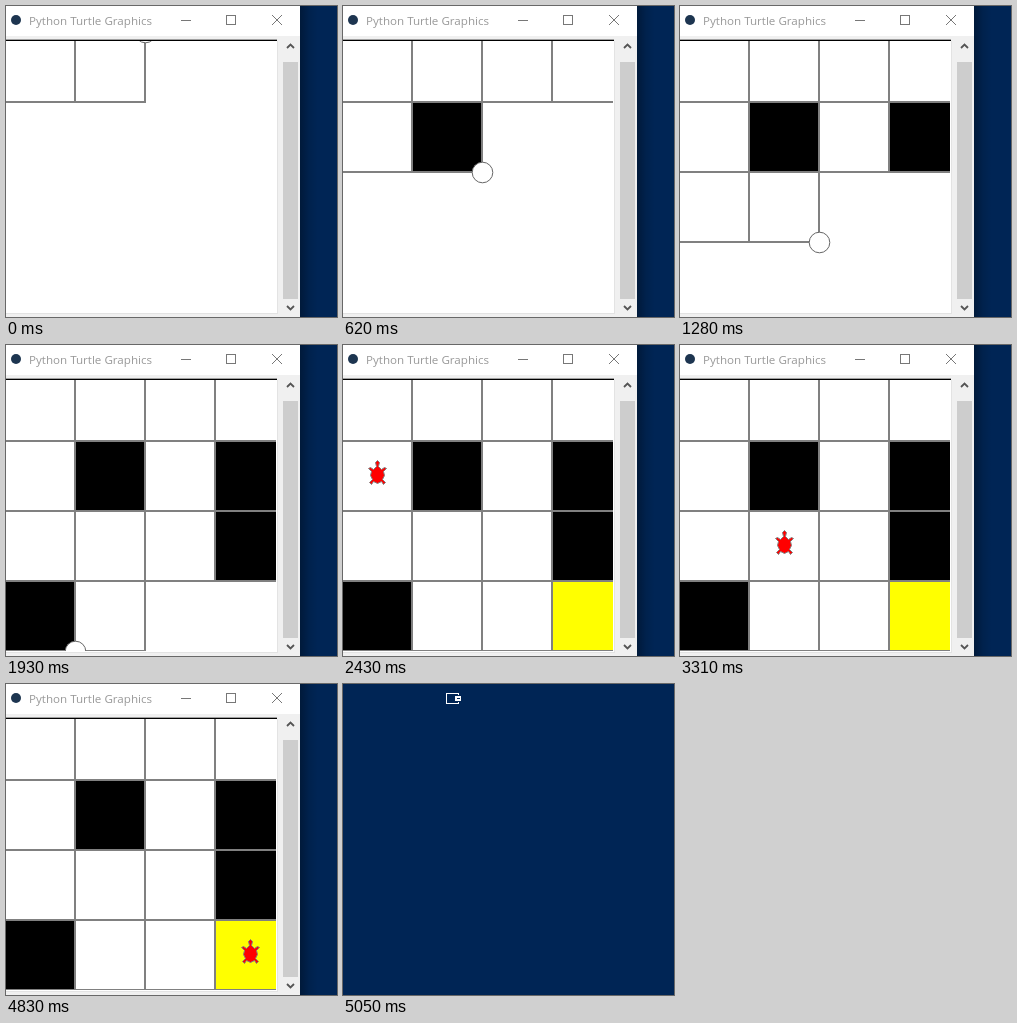
Animation, 331 px wide and 311 px high, one loop 5190 ms. Source, as an HTML page:

```html
<!DOCTYPE html>
<html lang="en">
<head>
<meta charset="utf-8">
<title>Grid world</title>
<style>
  html, body { margin: 0; width: 100%; height: 100%; overflow: hidden; background: #002555; }
  svg { display: block; width: 331px; height: 311px; }
  #win { transform-origin: 80px 165px; }
  text { font: 11.6px "Open Sans", "Noto Sans", sans-serif; fill: #999; }
</style>
</head>
<body>
<svg viewBox="0 0 331 311">
  <defs>
    <linearGradient id="shade">
      <stop offset="0" stop-color="#000" stop-opacity=".32"/>
      <stop offset=".5" stop-color="#000" stop-opacity=".1"/>
      <stop offset="1" stop-color="#000" stop-opacity="0"/>
    </linearGradient>
    <clipPath id="view"><rect y="35" width="270" height="271"/></clipPath>
  </defs>

  <rect width="331" height="311" fill="#002555"/>
  <g shape-rendering="crispEdges">
    <rect x="103.5" y="9.5" width="12" height="10" fill="none" stroke="#fff"/>
    <rect x="110" y="11" width="8" height="7" fill="#002555"/>
    <rect x="112" y="12" width="6" height="5" fill="#fff"/>
    <rect x="114" y="14" width="3" height="1" fill="#002555"/>
  </g>

  <g id="win">
    <rect x="294" width="18" height="311" fill="url(#shade)"/>
    <rect x="-150" width="444" height="330" fill="#f0f0f0"/>
    <rect x="-150" width="444" height="30" fill="#fff"/>
    <circle cx="10" cy="14" r="5" fill="#1d3550"/>
    <text x="23" y="19">Python Turtle Graphics</text>
    <g fill="none" stroke="#777">
      <path d="M175 14.5h10M220.5 9.5h9v9h-9z" shape-rendering="crispEdges"/>
      <path d="M266 9l10 10M276 9l-10 10"/>
    </g>

    <rect x="-150" y="33" width="421" height="1" fill="#a0a0a0"/>
    <rect x="-150" y="34" width="421" height="1" fill="#000"/>
    <rect x="-150" y="35" width="422" height="273" fill="#e3e3e3"/>
    <rect x="-150" y="35" width="421" height="272" fill="#fff"/>
    <rect x="277" y="56" width="15" height="237" fill="#cdcdcd"/>
    <path d="M281 42l3.5-3.5 3.5 3.5M281 300l3.5 3.5 3.5-3.5" fill="none" stroke="#555" stroke-width="1.8"/>

    <g clip-path="url(#view)">
      <g id="fills" shape-rendering="crispEdges"></g>
      <path id="lines" fill="none" stroke="#808080" stroke-width="2" shape-rendering="crispEdges"/>
      <circle id="pen" r="10.3" stroke="#666"/>
      <path id="turtle" fill="#f00" stroke="#808080"/>
    </g>
  </g>
</svg>
<script>
const LOOP = 5190, UNIT = 70, LEFT = -1, TOP = 26;
const CELL_MS = 166, FIRST = 2.31;           // drawing pace, progress at time 0
const MAP = "SFFF" + "FHFH" + "FFFH" + "HFFG";
const COLORS = { H: "#000", G: "#ff0" };
const SIDES = ["v-70", "h70", "v70", "h-70"];
const CORNERS = [[0, 1], [0, 0], [1, 0], [1, 1], [0, 1]];
const ROUTE = [[0, 1], [0, 2], [1, 2], [2, 2], [2, 3], [3, 3]];
const ROUTE_START = 2290, ROUTE_STEP = 500;
const CLOSE_START = 4870, CLOSE_MS = 170;

const $ = id => document.getElementById(id);
const [win, fills, lines, pen, turtle] = ["win", "fills", "lines", "pen", "turtle"].map($);
const set = (el, attrs) => { for (const k in attrs) el.setAttribute(k, attrs[k]); };
const color = i => COLORS[MAP[i]] || "#fff";
const px = col => LEFT + col * UNIT;
const py = row => TOP + row * UNIT;

const squares = [...MAP].map((_, i) => {
  const r = document.createElementNS("http://www.w3.org/2000/svg", "rect");
  set(r, { x: px(i % 4), y: py(i >> 2), width: UNIT, height: UNIT, fill: color(i) });
  return fills.appendChild(r);
});

// right half of the turtle, mirrored for the left
const half = [[0, -16], [2, -14], [1, -10], [4, -7], [7, -9], [9, -8], [6, -5],
  [7, -1], [5, 3], [8, 6], [6, 8], [4, 5], [0, 7]];
const mirror = half.slice(1, -1).reverse().map(([x, y]) => [-x, y]);
turtle.setAttribute("d", "M" + half.concat(mirror).join("L") + "z");

function snap(t) {
  if (t < 60) return 0;
  if (t < 620) return t - (t - 60) % 70;
  const u = (t - 620) % 290;
  return t - (u < 80 ? u : (u - 80) % 70);
}

function drawGrid(t) {
  const p = Math.min(FIRST + t / CELL_MS, 16);
  const now = Math.floor(p), side = Math.floor((p - now) * 5);
  let d = "";
  squares.forEach((sq, i) => {
    const n = i < now ? 4 : i === now ? side : 0;
    sq.style.display = n === 4 ? "" : "none";
    if (n) d += `M${px(i % 4)} ${py((i >> 2) + 1)}` + SIDES.slice(0, n).join("");
  });
  lines.setAttribute("d", d);

  const drawing = now < 16;
  pen.style.display = drawing ? "" : "none";
  turtle.style.display = drawing ? "none" : "";
  if (drawing) {
    const [dx, dy] = CORNERS[side];
    set(pen, { cx: px(now % 4 + dx) + .5, cy: py((now >> 2) + dy) + .5, fill: color(now) });
  } else {
    const n = Math.floor((t - ROUTE_START) / ROUTE_STEP);
    const [c, r] = ROUTE[Math.max(0, Math.min(n, ROUTE.length - 1))];
    turtle.setAttribute("transform", `translate(${px(c + .5) + .5} ${py(r + .5) + .5})`);
  }
}

function render(time) {
  const t = snap(time % LOOP);
  drawGrid(t);
  const k = Math.max(0, Math.min((t - CLOSE_START) / CLOSE_MS, 1));
  win.style.opacity = 1 - k;
  win.style.transform = k ? `scale(${1 - .08 * k})` : "none";
}

const start = performance.now();
function frame() {
  render(performance.now() - start);
  requestAnimationFrame(frame);
}
frame();
</script>
</body>
</html>
```
